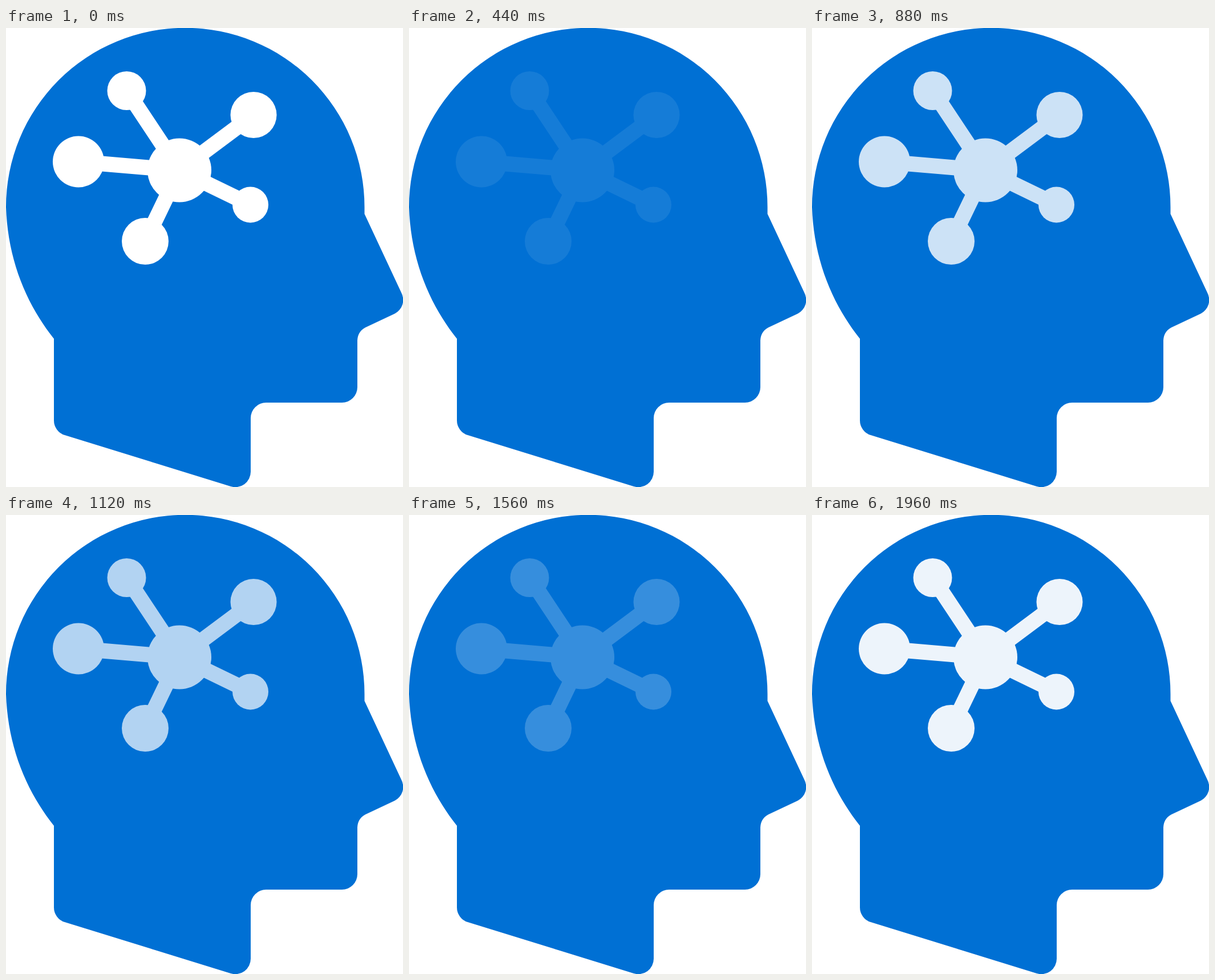
Recreate the animation shown at these times as an HTML page. Size 696 by 805 pixels, loop 2 s.

```html
<!DOCTYPE html>
<html lang="en">
<head>
<meta charset="utf-8">
<title>Thinking head</title>
<style>
  html, body { margin: 0; width: 100%; height: 100%; overflow: hidden; background: #fff; }
  svg { display: block; width: 696px; height: 805px; }
  .link { stroke: #fff; stroke-width: 27; }
</style>
</head>
<body>
<svg viewBox="0 0 696 805">
  <path fill="#0070d4" d="M0 314A314 314 0 0 1 628.5 314V326L693 464
    A27 27 0 0 1 681.5 501L629.5 525.5A27 27 0 0 0 616 548V630
    A27 27 0 0 1 589 657H456A27 27 0 0 0 429 684V778
    A27 27 0 0 1 394 804L103 714A27 27 0 0 1 84 688V545
    C34 482 3 404 0 314Z"/>
  <g id="network" fill="#fff">
    <path class="link" d="M304 249.5L211.5 110M304 249.5L434 152.5M304 249.5L127 234.5
      M304 249.5L428.5 310M304 249.5L244 374"/>
    <circle cx="304" cy="249.5" r="56"/>
    <circle cx="211.5" cy="110" r="34"/>
    <circle cx="434" cy="152.5" r="40.5"/>
    <circle cx="127" cy="234.5" r="45"/>
    <circle cx="428.5" cy="310" r="31.5"/>
    <circle cx="244" cy="374" r="41"/>
  </g>
</svg>
<script>
  const network = document.getElementById('network');
  const LOOP = 2000, TICK = 40;
  // The fade runs straight between these times: full, gone, full, gone, full.
  const turns = [0, 480, 980, 1442, LOOP];

  function opacityAt(t) {
    const next = turns.findIndex(time => time > t);
    const from = turns[next - 1];
    const part = (t - from) / (turns[next] - from);
    return next % 2 ? 1 - part : part;
  }

  const start = performance.now();
  function draw() {
    const t = Math.max(0, performance.now() - start) % LOOP;
    network.setAttribute('opacity', opacityAt(Math.floor(t / TICK) * TICK));
    requestAnimationFrame(draw);
  }
  draw();
</script>
</body>
</html>
```
